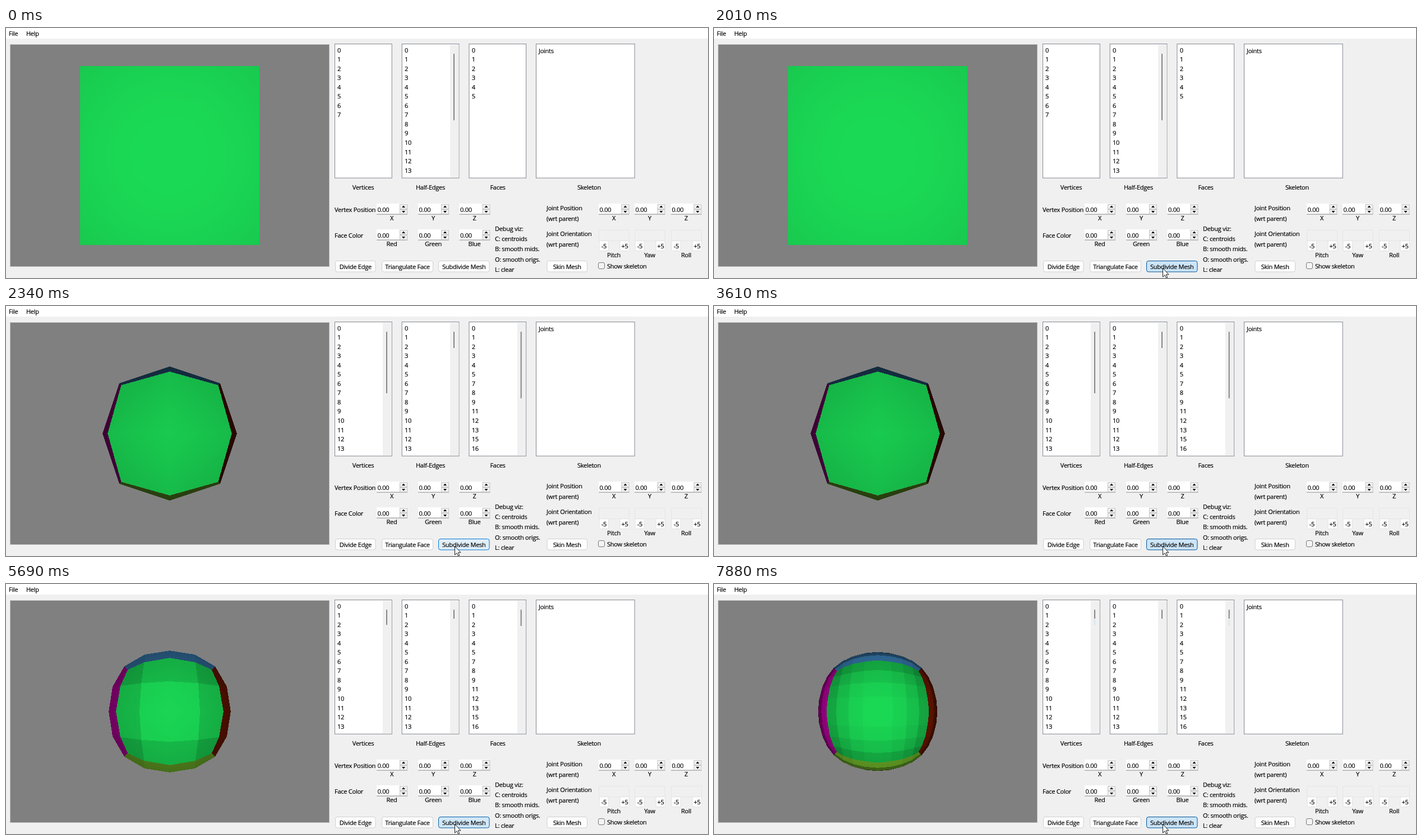
Animation of 1252x447 px, one loop 8 s. Source, as an HTML page with a canvas:

```html
<!DOCTYPE html>
<html lang="en">
<head>
<meta charset="utf-8">
<title>Mesh subdivision</title>
<style>
  html, body { margin: 0; width: 100%; height: 100%; overflow: hidden; background: #f0f0f0; }
  canvas, svg { position: absolute; left: 0; top: 0; }
  canvas { left: 7px; top: 29px; border: 1px solid #b8b8b8; }
  text {
    font: 11px "Open Sans", "Noto Sans", sans-serif; letter-spacing: -.25px;
    fill: #000; stroke: #000; stroke-width: .2px; white-space: pre;
  }
</style>
</head>
<body>
<canvas id="view" width="568" height="396"></canvas>
<svg id="ui" width="1252" height="447"></svg>
<script>
const W = 568, H = 396, FOCAL = 479.6, CAMERA = 4, LOOP = 8000;

// ---------- mesh ----------
const add = (a, b) => a.map((v, i) => v + b[i]);
const mul = (a, k) => a.map(v => v * k);
const sub = (a, b) => add(a, mul(b, -1));
const dot = (a, b) => a[0] * b[0] + a[1] * b[1] + a[2] * b[2];
const mean = list => mul(list.reduce(add), 1 / list.length);
const cross = (a, b) => [0, 1, 2].map(i => a[(i + 1) % 3] * b[(i + 2) % 3] - a[(i + 2) % 3] * b[(i + 1) % 3]);

function cube() {
  const colors = [[232, 2, 198], [144, 30, 0], [147, 236, 54], [74, 163, 232], [128, 128, 128], [22, 182, 71]];
  const points = [...Array(8).keys()].map(i => [0, 1, 2].map(a => (i >> a & 1) * 2 - 1));
  const faces = colors.map((color, i) => {
    const a = i >> 1, b = 1 << (a + 1) % 3, c = 1 << (a + 2) % 3;
    return { color, ids: [0, b, b | c, c].map(k => k | (i & 1) << a) };
  });
  return { points, faces };
}

function subdivide({ points, faces }) {
  const out = [], edges = new Map(), rings = points.map(() => ({ e: [], f: [] }));
  const key = (a, b) => Math.min(a, b) + "_" + Math.max(a, b);
  const centers = faces.map(f => mean(f.ids.map(i => points[i])));
  faces.forEach((f, k) => f.ids.forEach((a, i) => {
    const b = f.ids[(i + 1) % 4], id = key(a, b);
    if (!edges.has(id)) edges.set(id, { ends: [a, b], near: [points[a], points[b]] });
    edges.get(id).near.push(centers[k]);
    rings[a].f.push(centers[k]);
  }));
  for (const e of edges.values()) {
    e.mid = mean(e.near);
    e.ends.forEach(v => rings[v].e.push(e.mid));
  }
  points.forEach((p, i) => {
    const { e, f } = rings[i], n = e.length;
    out.push(mul(add(mul(p, n - 2), add(mean(e), mean(f))), 1 / n));
  });
  for (const e of edges.values()) e.id = out.push(e.mid) - 1;
  const quads = faces.flatMap((f, k) => {
    const c = out.push(centers[k]) - 1;
    const edgeId = i => edges.get(key(f.ids[i % 4], f.ids[(i + 1) % 4])).id;
    return f.ids.map((v, i) => ({ color: f.color, ids: [v, edgeId(i), c, edgeId(i + 3)] }));
  });
  return { points: out, faces: quads };
}

function outward(u, v, from) {
  const n = cross(u, v);
  return mul(n, Math.sign(dot(n, from)) / Math.hypot(...n));
}

// Headlight at the camera, one normal per face, 0.2 ambient.
function render({ points, faces }) {
  const image = new ImageData(W, H), px = image.data.fill(128);
  for (let i = 3; i < px.length; i += 4) px[i] = 255;
  const project = ([x, y, z]) => [W / 2 + x * FOCAL / (CAMERA - z), H / 2 - y * FOCAL / (CAMERA - z)];
  const side = (a, b, x, y) => (b[0] - a[0]) * (y - a[1]) - (b[1] - a[1]) * (x - a[0]);

  for (const { ids, color } of faces) {
    const q = ids.map(i => points[i]), center = mean(q);
    const n = outward(sub(q[2], q[0]), sub(q[3], q[1]), center);
    for (const tri of [[q[0], q[1], q[2]], [q[0], q[2], q[3]]]) {
      const facing = outward(sub(tri[1], tri[0]), sub(tri[2], tri[0]), center);
      if (dot(facing, sub([0, 0, CAMERA], tri[0])) <= 0) continue;
      const [a, b, c] = tri.map(project);
      const xs = [a[0], b[0], c[0]], ys = [a[1], b[1], c[1]];
      for (let y = Math.floor(Math.min(...ys)); y <= Math.max(...ys); y++)
        for (let x = Math.floor(Math.min(...xs)); x <= Math.max(...xs); x++) {
          const cx = x + .5, cy = y + .5;
          const s = [side(a, b, cx, cy), side(b, c, cx, cy), side(c, a, cx, cy)];
          if (Math.min(...s) < -1e-6 && Math.max(...s) > 1e-6) continue;
          const ray = [(W / 2 - cx) / FOCAL, (cy - H / 2) / FOCAL, 1];
          const light = .2 + Math.max(0, dot(n, ray) / Math.hypot(...ray));
          color.forEach((v, i) => px[(y * W + x) * 4 + i] = v * light);
        }
    }
  }
  return image;
}

const views = [];
for (let mesh = cube(), i = 0; i < 4; i++, mesh = subdivide(mesh)) views.push(render(mesh));

// ---------- interface ----------
const text = (x, y, s, anchor = "start") => `<text x="${x}" y="${y}" text-anchor="${anchor}">${s}</text>`;
const mid = (x, y, s) => text(x, y, s, "middle");
const rect = (x, y, w, h, fill, stroke = "none", more = "") =>
  `<rect x="${x}" y="${y}" width="${w}" height="${h}" fill="${fill}" stroke="${stroke}" ${more}/>`;
const listBox = (x, w) => rect(x + .5, 28.5, w, 239.7, "#fff", "#828790");
const button = (x, w, s, id = "") =>
  rect(x + .5, 416.5, w, 19.5, "#fdfdfd", "#d0d0d0", `rx="3.5" id="${id}"`) + mid(x + .5 + w / 2, 430.5, s);

function spin(x, y, w, label) {
  const bx = x + w - 13.5, ax = bx + 6.5;
  return rect(x, y, w, 19, "#fff") + rect(x, y + 18.5, w, 1, "#868686") +
    [y + 1.5, y + 10.5].map(v => rect(bx, v, 13, 8, "#f0f0f0", "#c4c4c4")).join("") +
    `<path d="M${ax - 3} ${y + 7}h6l-3-3.5zM${ax - 3} ${y + 13}h6l-3 3.5z"/>` +
    text(x + 1.5, y + 14.5, "0.00") + mid(x + 27, y + 30, label);
}

function angle(x, label) {
  return rect(x + .5, 361.5, 54, 19, "#f0f0f0", "#e6e6e6") +
    [[x + 1, "-5"], [x + 38, "+5"]].map(([bx, s]) =>
      rect(bx, 380.5, 16.5, 18, "#fdfdfd", "#e2e2e2", 'rx="2"') + mid(bx + 8.5, 394, s)).join("") +
    mid(x + 27, 410, label);
}

const spinRow = (xs, y, w, labels) => xs.map((x, i) => spin(x, y, w, labels[i])).join("");
const ui = document.getElementById("ui");
ui.innerHTML =
  rect(0, 0, 1252, 19, "#fff") + text(5, 14, "File") + text(36, 14, "Help") +
  [586, 705.7, 825.4].map(x => listBox(x, 101.7)).join("") + listBox(945, 175.7) + text(950, 45, "Joints") +
  `<g id="lists"></g>` +
  mid(637, 289, "Vertices") + mid(757, 289, "Half-Edges") + mid(877, 289, "Faces") + mid(1040, 289, "Skeleton") +
  text(586, 328.5, "Vertex Position") + spinRow([661, 735, 808.5], 314, 55, "XYZ") +
  text(586, 374.5, "Face Color") + spinRow([661, 735, 808.5], 360, 55, ["Red", "Green", "Blue"]) +
  ["Debug viz:", "C: centroids", "B: smooth mids.", "O: smooth origs.", "L: clear"]
    .map((s, i) => text(872, 362.5 + i * 18.4, s)).join("") +
  text(964, 326, "Joint Position") + text(964, 344.5, "(wrt parent)") +
  text(964, 372, "Joint Orientation") + text(964, 390.5, "(wrt parent)") +
  spinRow([1057, 1121, 1186], 314, 54.5, "XYZ") +
  ["Pitch", "Yaw", "Roll"].map((s, i) => angle([1057, 1121, 1186][i], s)).join("") +
  button(587, 71.5, "Divide Edge") + button(670, 91, "Triangulate Face") +
  button(771, 90.5, "Subdivide Mesh", "action") + button(964.5, 71.5, "Skin Mesh") +
  rect(1056.5, 419.5, 11, 11, "#f4f4f4", "#777", 'rx="2.5"') + text(1072, 429.5, "Show skeleton") +
  `<path id="cursor" d="M.5 .5v15.5l3.5-3.3 2.6 5.3 2.2-1-2.5-5.2h4.7z" fill="#fff" stroke="#000" stroke-width=".9"/>`;

// Bottom end of each scroll thumb, per subdivision level; 0 means no scroll bar.
const THUMBS = [[0, 165, 0], [156, 75, 165], [73, 62, 75], [62, 62, 62]];
const COUNTS = [8, 14, 6];

function lists(level) {
  return [586, 706, 825.7].map((x, col) => {
    const end = THUMBS[level][col], rows = level ? 14 : COUNTS[col];
    let s = "";
    if (end) {
      s += rect(x + 86, 30, 15.5, 237, "#f0f0f0") + rect(x + 92, 46, 2, end - 46, "#868686");
      if (level === 3 && col !== 1) s += rect(x + 92, 64, 2, 10, "#d5e5f0");
    }
    for (let i = 0; i < rows; i++) {
      const n = col === 2 && i > 5 ? i + Math.floor((i - 3) / 3) : i;
      s += text(x + 5, 43.5 + i * 16.55, n);
    }
    return s;
  }).join("");
}

// ---------- timeline ----------
const STEP = 67;
const PRESSES = [[1810, 2140], [3400, 4000], [5550, 6085], [7610, 9000]];
const SPLITS = [2080, 3930, 6020];
const fade = (t, start) => Math.max(0, Math.min(1, Math.floor((t - start) / STEP + 1.05) / 4));
const mix = (a, b, k) => a.map((v, i) => v + (b[i] - v) * k);
const css = c => `rgb(${c.map(Math.round)})`;

const ctx = document.getElementById("view").getContext("2d");
const action = document.getElementById("action"), cursor = document.getElementById("cursor");
const listGroup = document.getElementById("lists");
let shown = -1;

function draw(t) {
  const level = SPLITS.filter(s => t >= s).length;
  if (level !== shown) {
    shown = level;
    ctx.putImageData(views[level], 0, 0);
    listGroup.innerHTML = lists(level);
  }
  const hover = fade(t, 1055);
  const press = Math.max(...PRESSES.map(([down, up]) => fade(t, down) - fade(t, up)));
  action.setAttribute("fill", css(mix(mix([253, 253, 253], [224, 238, 249], hover), [204, 228, 247], press)));
  action.setAttribute("stroke", css(mix(mix([208, 208, 208], [0, 120, 212], hover), [0, 84, 153], press)));

  const k = Math.min(1, Math.max(0, Math.floor((t - 790) / STEP) / 4));
  const go = 1 - (1 - k) ** 2;
  cursor.setAttribute("transform", `translate(${928 - 128 * go} ${413 + 16 * go})`);
  cursor.setAttribute("visibility", t < 790 ? "hidden" : "visible");
}

const start = performance.now();
function tick() {
  draw((performance.now() - start) % LOOP);
  requestAnimationFrame(tick);
}
draw(0);
requestAnimationFrame(tick);
</script>
</body>
</html>
```
